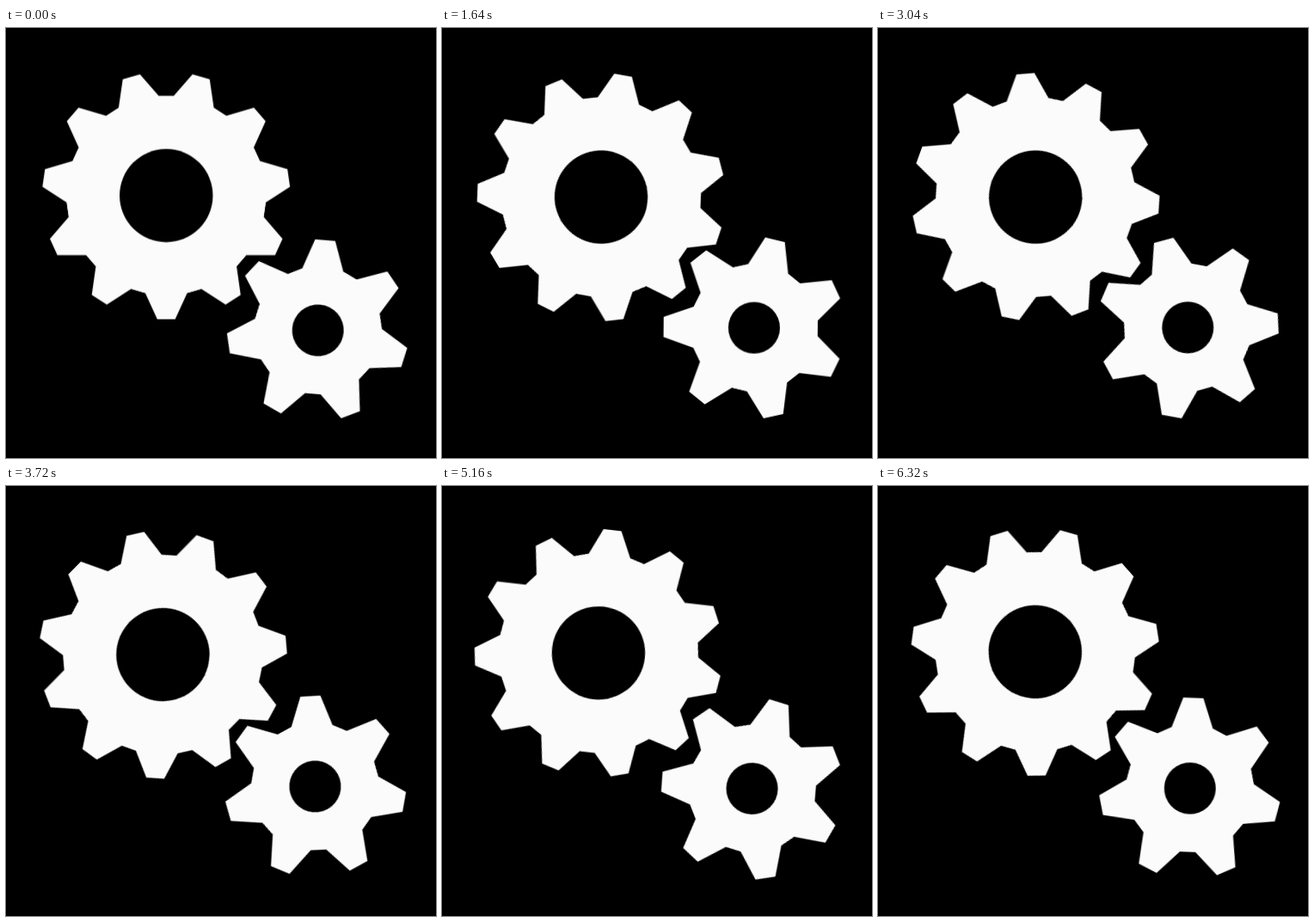
An HTML page without scripts that plays this animation: 500x500 px, repeating every 6360 ms.

```html
<!DOCTYPE html>
<html lang="en">
<head>
<meta charset="utf-8">
<title>Gears</title>
<style>
  html, body { margin: 0; width: 100%; height: 100%; overflow: hidden; background: #000; }
  svg { display: block; width: 100vw; height: 100vh; }
  .gear { fill: #fbfbfb; }
  .hole { fill: #000; }

  /* 159 ticks of 40 ms; the tiny head start keeps tick edges clean */
  .spin {
    transform-origin: 0 0;
    animation: turn 6.36s steps(159, end) -1ms infinite;
  }
  .large { --turn: 229.88deg; }
  .small { --turn: -364.75deg; }
  @keyframes turn {
    from { transform: rotate(0deg); }
    to { transform: rotate(var(--turn)); }
  }
</style>
</head>
<body>
<svg viewBox="0 0 500 500" xmlns="http://www.w3.org/2000/svg">
  <defs>
    <!-- one tooth with the valleys on both sides, pointing down -->
    <polygon id="big" points="0,0 -40.7,108.6 -24.4,113.4 -10.4,143.9 10.4,143.9 24.4,113.4 40.7,108.6"/>
    <polygon id="little" points="0,0 -39.9,62.6 -24,70.2 -11.7,105.2 11.7,105.2 24,70.2 39.9,62.6"/>
  </defs>

  <!-- each gear turns about a pivot slightly off its middle -->
  <g transform="translate(184.1 194.6)">
    <g class="spin large">
      <g class="gear" transform="translate(2.2 .2)">
        <use href="#big"/>
        <use href="#big" transform="rotate(32.727)"/>
        <use href="#big" transform="rotate(65.455)"/>
        <use href="#big" transform="rotate(98.182)"/>
        <use href="#big" transform="rotate(130.909)"/>
        <use href="#big" transform="rotate(163.636)"/>
        <use href="#big" transform="rotate(196.364)"/>
        <use href="#big" transform="rotate(229.091)"/>
        <use href="#big" transform="rotate(261.818)"/>
        <use href="#big" transform="rotate(294.545)"/>
        <use href="#big" transform="rotate(327.273)"/>
        <circle class="hole" r="54.2"/>
      </g>
    </g>
  </g>

  <g transform="translate(361.4 350)">
    <g class="spin small">
      <g class="gear" transform="translate(1.3 1.6) rotate(184.6)">
        <use href="#little"/>
        <use href="#little" transform="rotate(51.429)"/>
        <use href="#little" transform="rotate(102.857)"/>
        <use href="#little" transform="rotate(154.286)"/>
        <use href="#little" transform="rotate(205.714)"/>
        <use href="#little" transform="rotate(257.143)"/>
        <use href="#little" transform="rotate(308.571)"/>
        <circle class="hole" r="30"/>
      </g>
    </g>
  </g>
</svg>
</body>
</html>
```
